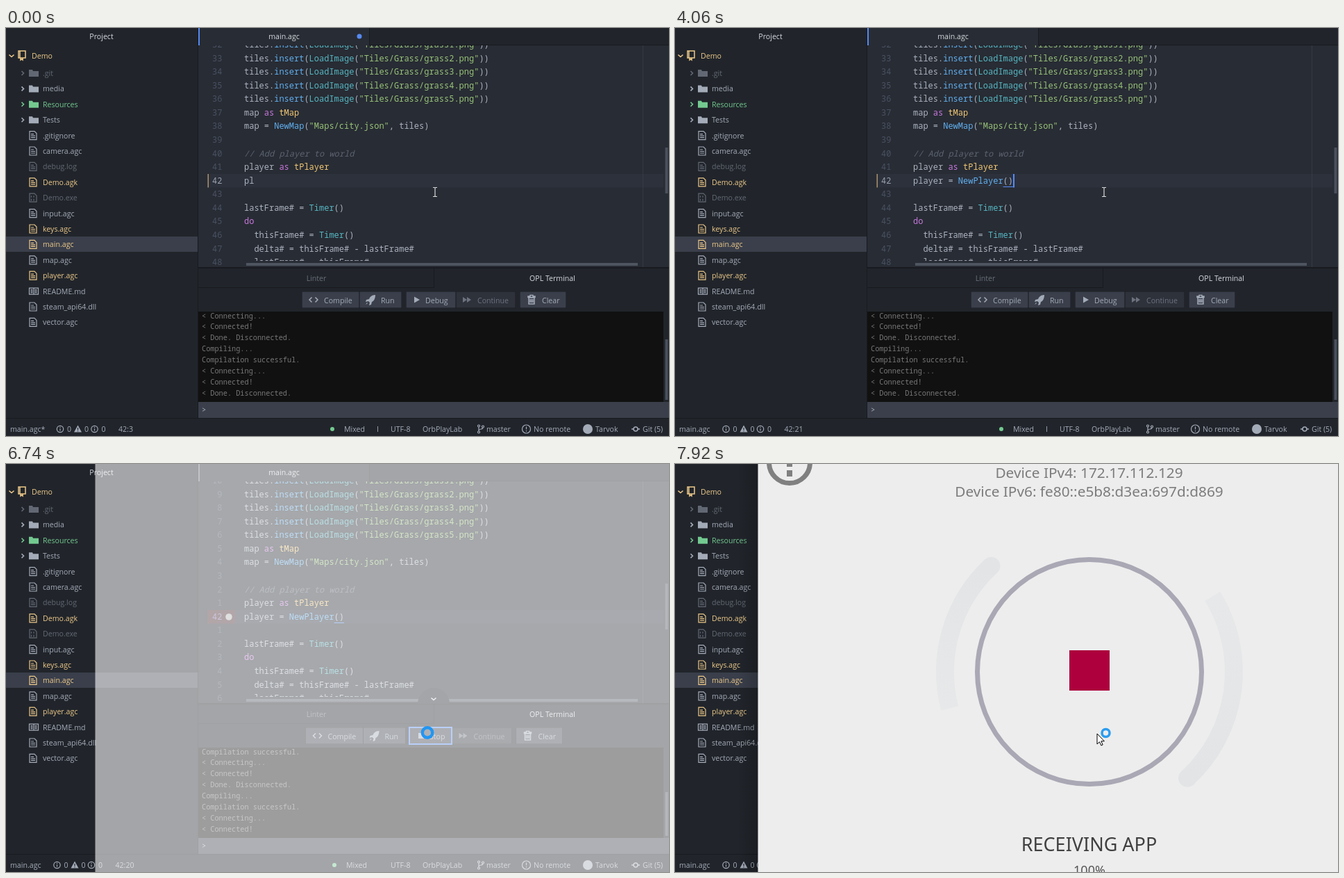
Animation of 955 by 587 pixels, one loop 8 s. Source, as an HTML page with a canvas:

```html
<!DOCTYPE html>
<html lang="en">
<head>
<meta charset="utf-8">
<title>Editor debug session</title>
<style>
html, body { margin: 0; width: 100%; height: 100%; overflow: hidden; background: #21252b; }
canvas { display: block; }
</style>
</head>
<body>
<canvas id="stage" width="955" height="587"></canvas>
<script>
const c = document.getElementById('stage').getContext('2d');
const LOOP = 8000, COL = 7.2, CODE_X = 343, PITCH = 19.57;
const UI = '10.6px "Open Sans", sans-serif';
const MONO = '12px "Noto Sans Mono", monospace';
const TERM = '10.25px "Noto Sans Mono", monospace';
const PANEL = '#21252b', EDIT = '#282c34', EDGE = '#181a1f', LIT = '#3a3f4b';
const FG = '#abb2bf', TEXT = '#a4abb8', DIM = '#626873', GOLD = '#edc98a', GREEN = '#73c990', BLUE = '#568af2';

const CODE = `tiles.insert(LoadImage("Tiles/Grass/grass1.png"))
tiles.insert(LoadImage("Tiles/Grass/grass2.png"))
tiles.insert(LoadImage("Tiles/Grass/grass3.png"))
tiles.insert(LoadImage("Tiles/Grass/grass4.png"))
tiles.insert(LoadImage("Tiles/Grass/grass5.png"))
map as tMap
map = NewMap("Maps/city.json", tiles)

// Add player to world
player as tPlayer


lastFrame# = Timer()
do
  thisFrame# = Timer()
  delta# = thisFrame# - lastFrame#
  lastFrame# = thisFrame#`.split('\n');
const TYPED = 'player = NewPlayer()';
const KEYS = [[0, 2], [150, 3], [1240, 4], [1750, 5], [1900, 6], [2210, 7], [2330, 8], [2460, 9], [2600, 10],
  [2740, 11], [2870, 12], [3010, 13], [3140, 14], [3420, 18], [3690, 19], [3875, 20]];
const LOG = ['< Connecting...', '< Connected!', '< Done. Disconnected.', 'Compiling...', 'Compilation successful.'];
const TREE = [['.git', 'dir', DIM], ['media', 'dir', TEXT], ['Resources', 'dir', GREEN], ['Tests', 'dir', TEXT],
  ['.gitignore', 'doc', TEXT], ['camera.agc', 'doc', TEXT], ['debug.log', 'doc', DIM], ['Demo.agk', 'doc', GOLD],
  ['Demo.exe', 'bin', DIM], ['input.agc', 'doc', TEXT], ['keys.agc', 'doc', GOLD], ['main.agc', 'doc', GOLD],
  ['map.agc', 'doc', TEXT], ['player.agc', 'doc', GOLD], ['README.md', 'book', TEXT],
  ['steam_api64.dll', 'doc', TEXT], ['vector.agc', 'doc', TEXT]];

// Icon outlines around their centre; names in FILLED are painted solid.
const ICONS = {
  dir: 'M-7-5h5l1 2h8v8h-14z',
  doc: 'M-5-6h7l3 3v9h-10zM-3-2h4M-3 .5h6M-3 3h6',
  bin: 'M-5-6h7l3 3v9h-10zM-2.5-3v2.5M1-3v2.5M-2.5 1.5v3M1 1.5v3',
  book: 'M-6.5-4.5h6l.5 1 .5-1h6v9h-13zM0-3v7.5M-4.5-2h3M-4.5 0h3M-4.5 2h3M1.5-2h3M1.5 0h3M1.5 2h3',
  repo: 'M-5-6h10v10h-10zM-3-6v10M-2 4v3l1.5-1 1.5 1v-3',
  right: 'M-1.5-3l3 3-3 3', down: 'M-3.5-1.5l3.5 3 3.5-3',
  code: 'M-2.5-3.5l-3.5 3.5 3.5 3.5M2.5-3.5l3.5 3.5-3.5 3.5',
  rocket: 'M7-7c-5 0-8 3-9 6l-4 1-1 3 4-1 2 2-1 4 3-1 1-4c3-1 5-5 5-10zM-5 4l-2 3 3-2z',
  play: 'M-4-4.5l8 4.5-8 4.5z', skip: 'M-6-4l6 4-6 4zM0-4l6 4-6 4z', stop: 'M-4-4h8v8h-8z',
  trash: 'M-5-5h3v-1.5h4v1.5h3v1.5h-10zM-4-3h8v9h-8zM-2-1v5M0-1v5M2-1v5',
  warn: 'M0-5.5l5.5 10h-11zM-.6-2v3.5h1.2v-3.5zM-.6 2.4v1.2h1.2v-1.2z',
  branch: 'M-3-3v6M3-2c0 3-5 1-6 4M-4.5-4.5a1.5 1.5 0 1 0 3 0a1.5 1.5 0 1 0-3 0M-4.5 4.5a1.5 1.5 0 1 0 3 0a1.5 1.5 0 1 0-3 0M1.5-3.5a1.5 1.5 0 1 0 3 0a1.5 1.5 0 1 0-3 0',
  commit: 'M-6 0h3M3 0h3M-3 0a3 3 0 1 0 6 0a3 3 0 1 0-6 0',
  bang: 'M-6 0a6 6 0 1 0 12 0a6 6 0 1 0-12 0M0-3.5v4M0 2v1.5',
  info: 'M-4.7 0a4.7 4.7 0 1 0 9.4 0a4.7 4.7 0 1 0-9.4 0M0-3v1.2M0-.5v3',
  ibeam: 'M-3-6.5h2.2l.8.7.8-.7h2.2M0-6v12M-3 6.5h2.2l.8-.7.8.7h2.2',
  arrow: 'M0 0v15l3.5-3.2 2.4 5.2 2.3-1-2.4-5.2h4.6z'
};
const FILLED = ['dir', 'rocket', 'play', 'skip', 'stop', 'warn'];

function box(x, y, w, h, color) { c.fillStyle = color; c.fillRect(x, y, w, h); }
function disc(x, y, r, color) { c.fillStyle = color; c.beginPath(); c.arc(x, y, r, 0, 7); c.fill(); }
function arc(x, y, r, width, color, from = 0, to = 2 * Math.PI) {
  c.strokeStyle = color; c.lineWidth = width;
  c.beginPath(); c.arc(x, y, r, from, to); c.stroke();
}
function fade(x1, y1, x2, y2, from, to) {
  const g = c.createLinearGradient(x1, y1, x2, y2);
  g.addColorStop(0, from); g.addColorStop(1, to);
  return g;
}
function text(s, x, y, color = TEXT, font = UI, align = 'left') {
  c.font = font; c.fillStyle = color; c.textAlign = align; c.fillText(s, x, y + 4);
}
function icon(name, x, y, color = TEXT, width = 1.2) {
  const path = new Path2D(ICONS[name]);
  c.save(); c.translate(x, y);
  c.fillStyle = c.strokeStyle = color; c.lineWidth = width;
  if (FILLED.includes(name)) c.fill(path, 'evenodd'); else c.stroke(path);
  c.restore();
}
function clip(x, y, w, h, draw) {
  c.save(); c.beginPath(); c.rect(x, y, w, h); c.clip(); draw(); c.restore();
}
function arrow(x, y) {
  c.save(); c.translate(x, y); c.fillStyle = '#fff'; c.fill(new Path2D(ICONS.arrow)); c.restore();
  icon('arrow', x, y, '#000', 1);
}

// Everything that changes, derived from the time.
function stateAt(t) {
  const len = KEYS.filter(k => k[0] <= t).pop()[1];
  const step = t < 5800 ? 0 : Math.min(8, 1 + Math.floor((t - 5800) / 134.28));
  const normal = t >= 4530, focus = step < 5;
  return {
    len, step, normal, focus,
    line: TYPED.slice(0, len === 19 ? 20 : len),
    caret: t >= 150 && !(t >= 550 && t < 830),
    mode: !focus ? '' : normal ? 'N' : 'I',
    saved: t >= 4060, relative: t >= 4660, stop: t >= 5400,
    logs: Math.max(0, step - 4), running: step >= 7
  };
}

function sidebar() {
  text('Project', 137.5, 12, '#d7dae0', UI, 'center');
  icon('down', 8, 40, GOLD, 1.6);
  icon('repo', 23, 39, GOLD, 1.5);
  text('Demo', 37, 39.5, GOLD);
  box(0, 300, 276, 22, LIT);
  TREE.forEach(([name, kind, color], i) => {
    const y = 65 + 22.4 * i;
    if (kind === 'dir') icon('right', 24, y, color, 1.6);
    icon(kind, kind === 'dir' || kind === 'book' ? 40 : 39, y, color);
    text(name, 53, y, color);
  });
  box(276, 0, 1, 562, EDGE);
}

function codeLine(s, y) {
  const token = /(\/\/.*)|("[^"]*")|\b(as|do)\b|\b(LoadImage|Timer)(?=\()|(\w+)(?=\()|\b(t[A-Z]\w+)|\w+#?|\S/g;
  const colors = ['#5c6370', '#98c379', '#c678dd', '#56b6c2', '#61afef', '#f0c674'];
  for (const m of s.matchAll(token)) {
    const kind = m.slice(1).findIndex(Boolean);
    text(m[0], CODE_X + m.index * COL, y, colors[kind] || FG, kind ? MONO : 'italic ' + MONO);
  }
}

function editor(s) {
  box(277, 0, 246, 25, EDIT);
  box(523, 0, 1, 25, EDGE);
  box(524, 24, 431, 1, EDGE);
  box(277, 0, 2, 25, s.focus ? BLUE : '#6b717d');
  text('main.agc', 400.5, 12, '#d7dae0', UI, 'center');
  if (!s.saved) disc(509, 12, 3.5, BLUE);

  box(277, 25, 678, 319, EDIT);
  box(290, 210, 657, 19.5, '#2c313c');
  box(917, 25, 1, 319, '#353a43');
  if (s.stop) {
    box(290, 210, 40, 19.5, '#45272f');
    disc(321, 220, 4.8, '#b5b5b5');
  } else box(290.5, 210, 1.5, 19.5, '#a98f6c');

  clip(277, 25, 678, 319, () => CODE.forEach((_, i) => {
    const n = 32 + i, here = n === 42;
    const color = !here ? '#495162' : s.stop ? '#8276a8' : '#98a0ad';
    text(s.relative && !here ? Math.abs(n - 42) : n, 311.5, 24 + PITCH * i, color, MONO, 'right');
  }));
  const x = CODE_X + s.len * COL;
  if (s.normal && s.focus) box(x - COL, 210, COL, 19.5, '#4269bd');
  clip(277, 25, 678, 310, () => CODE.forEach((line, i) => codeLine(i === 10 ? s.line : line, 24 + PITCH * i)));
  if (s.line.length === 20) box(CODE_X + 18 * COL, 228, 2 * COL, 1, BLUE);
  if (!s.normal && s.caret) box(Math.round(x), 210, 2, 19.5, '#528bff');

  box(346, 338, 564, 4, '#4e5561');
  box(949.5, 172, 4, 66, '#4b515d');
}

function button(x, w, name, glyph, glyphX, labelX, color = TEXT, fill = LIT) {
  box(x, 379, w, 24, EDGE);
  box(x + .5, 379.5, w - 1, 23, fill);
  icon(glyph, glyphX, 391, color, 1.5);
  text(name, labelX, 391.5, color);
}

function dock(s) {
  box(277, 344, 678, 2, EDGE);
  box(277, 373, 340, 1, EDGE);
  box(616, 346, 1, 28, EDGE);
  text('Linter', 447, 360, '#686e79', UI, 'center');
  text('OPL Terminal', 787, 360, '#d7dae0', UI, 'center');

  const d = s.running ? 5.5 : 0;
  button(426 + d, 83, 'Compile', 'code', 443 + d, 458 + d);
  button(509 + d, 61, 'Run', 'rocket', 525 + d, 540 + d);
  if (s.running) button(581, 62, 'Stop', 'stop', 598, 610);
  else button(576, 72, 'Debug', 'play', 592, 604);
  button(648 - d, 86, 'Continue', 'skip', 664 - d, 679 - d, '#6c727e', '#2e323b');
  button(740 - d, 67, 'Clear', 'trash', 757 - d, 772 - d);
  if (s.running) { c.strokeStyle = BLUE; c.lineWidth = 2; c.strokeRect(581, 379, 61, 24); }

  box(277, 408, 670, 130, '#111');
  clip(277, 408, 670, 130, () => {
    for (let i = 0; i < 8; i++) text(LOG[(i + s.logs) % 5], 282, 413.5 + 15.87 * i, '#777', TERM);
  });
  const top = 448 + 6 * s.logs;
  box(949.5, top, 4, 535 - top, '#4b515d');
  box(277, 538, 678, 23, LIT);
  text('>', 282, 549, FG, TERM);

  if (s.step >= 3) {
    clip(590, 320, 52, 25, () => disc(616, 345, 23, PANEL));
    icon('down', 616, 338, '#d7dae0', 1.6);
  }
}

function statusBar(s) {
  box(0, 561, 955, 1, EDGE);
  box(0, 562, 955, 25, PANEL);
  const y = 577, d = s.saved ? -4.5 : 0;
  text('main.agc' + (s.saved ? '' : '*'), 6, y);
  ['info', 'warn', 'info'].forEach((name, i) => {
    icon(name, [78, 103.5, 127.5][i] + d, y);
    text('0', [88, 113, 137.5][i] + d, y);
  });
  text('42:' + (s.normal ? 20 : s.len + 1), 162 + d, y);
  const shift = { I: 0, N: -5.5, '': 3 }[s.mode];
  disc(470 + shift, y, 3, GREEN);
  text('Mixed', 487 + shift, y);
  text(s.mode, s.mode === 'N' ? 529 : 534, y);
  text('UTF-8', 554, y);
  text('OrbPlayLab', 600, y);
  icon('branch', 684, y);
  text('master', 692, y);
  icon('bang', 749.5, y);
  text('No remote', 760, y);
  disc(838, y, 7, TEXT);
  text('Tarvok', 849, y);
  icon('commit', 907, y, TEXT, 1.5);
  text('Git (5)', 917, y);
}

function receiver(t) {
  const sans = px => px + 'px "Noto Sans", sans-serif';
  const cx = 597, cy = 299, r = 208, rad = Math.PI / 180;
  box(119.5, 0, 836, 587, '#ededed');
  arc(165, -2, 29.5, 7, '#808080');
  box(161, -16, 8, 20, '#808080');
  box(161, 9, 8, 9, '#808080');
  text('Device IPv4: 172.17.112.129', 596.5, 16, '#7c7c7c', sans(20.8), 'center');
  text('Device IPv6: fe80::e5b8:d3ea:697d:d869', 596.5, 43, '#7c7c7c', sans(20.8), 'center');
  const turn = Math.min(0, t - 7920) * .09;
  for (const [from, to] of [[165.4, 227.1], [-31.5, 47.3]]) {
    const a = (from + turn) * rad, b = (to + turn) * rad;
    const x = cx + r * Math.cos(b), y = cy + r * Math.sin(b);
    const tail = fade(cx + r * Math.cos(a), cy + r * Math.sin(a), x, y, '#e7e8e9', '#e2e4e6');
    arc(cx, cy, r, 26, tail, a, b);
    disc(x, y, 13, '#e2e4e6');
  }
  arc(cx, cy, 161.5, 7, '#aaa8b4');
  box(568, 268, 58, 58, '#ad003d');
  text('RECEIVING APP', 596.5, 552.5, '#404040', sans(27), 'center');
  text('100%', 597, 587, '#555', sans(18), 'center');
}

function appWindow(t) {
  if (t < 6740) return;
  const left = t < 6890 ? 128.5 : t < 7010 ? 122 : 119.5;
  const alpha = t < 6890 ? .59 : t < 7010 ? .9 : 1;
  if (t >= 6890) box(90, 0, left - 90, 587, fade(90, 0, left, 0, 'rgba(0,0,0,0)', 'rgba(0,0,0,.2)'));
  if (t >= 7530) receiver(t);
  else box(left, 0, 955 - left, 587, t < 7280 ? `rgba(255,255,255,${alpha})` : '#000');
}

function pointer(t, s) {
  if (t >= 7530) {
    arrow(608, 388);
    arc(620.5, 387, 5.5, 3.5, '#2b9cf0');
  } else if (s.running) {
    arc(607, 386.5, 7.2, 4.4, '#2196f3');
  } else {
    const u = Math.min(1, s.step / 4), x = 618 - 11 * u, y = 236 + 151 * u;
    if (y < 344) icon('ibeam', x, y, '#d8d8d8', 1.2); else arrow(x, y);
  }
}

function frame(now) {
  const t = now % LOOP, s = stateAt(t);
  box(0, 0, 955, 587, PANEL);
  sidebar();
  editor(s);
  dock(s);
  statusBar(s);
  appWindow(t);
  pointer(t, s);
  requestAnimationFrame(frame);
}
requestAnimationFrame(frame);
</script>
</body>
</html>
```
